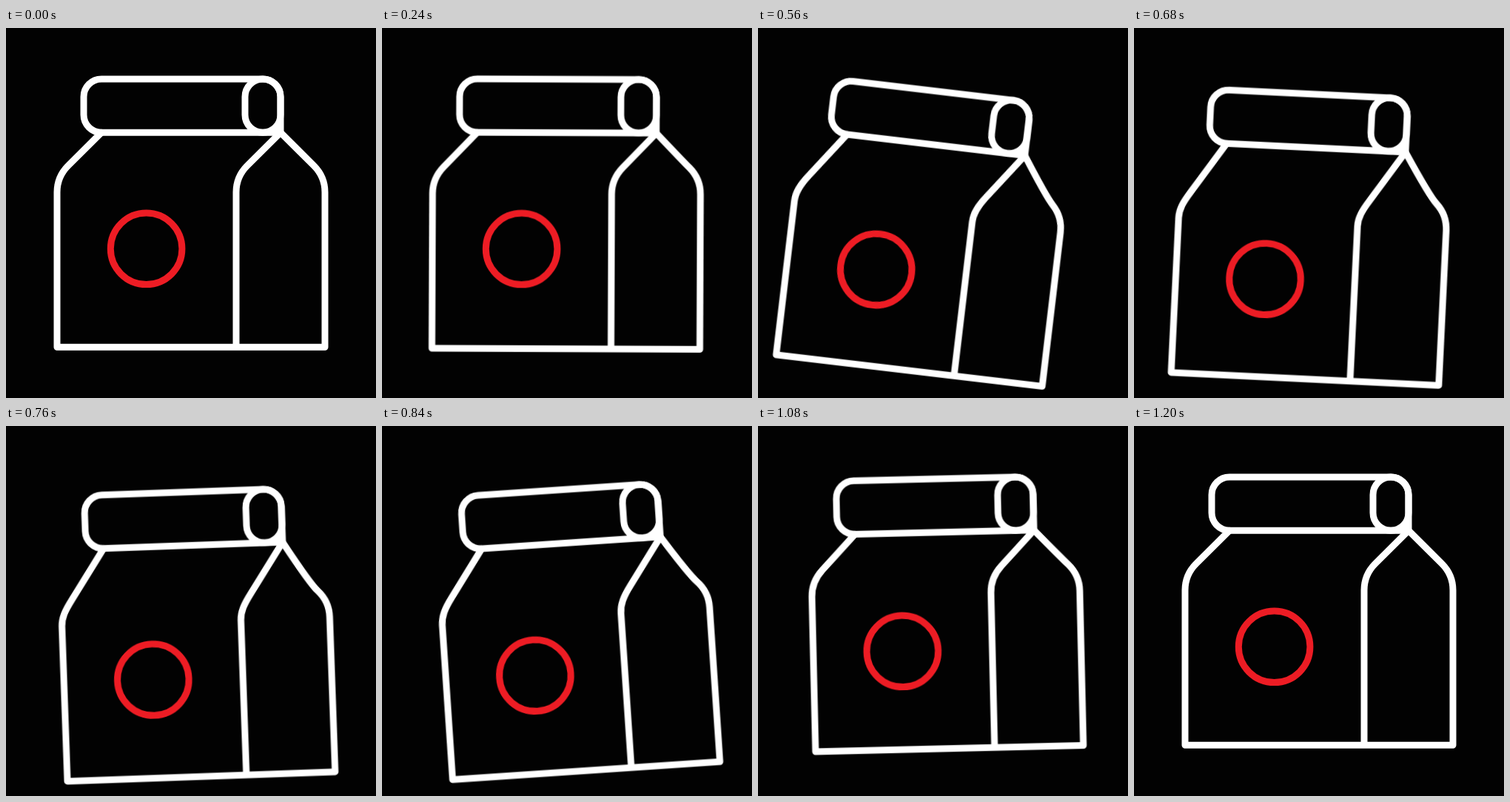
Recreate the animation shown at these times as an HTML page without scripts. Size 500 by 500 pixels, loop 1400 ms.

```html
<!DOCTYPE html>
<html lang="en">
<head>
<meta charset="utf-8">
<title>Bouncing paper bag</title>
<style>
  html, body { margin: 0; width: 100%; height: 100%; overflow: hidden; background: #020202; }
  svg { display: block; width: 100%; height: 100%; }

  .lines { fill: none; stroke: #fff; stroke-width: 9; stroke-linejoin: round; stroke-linecap: round; }
  .badge { stroke: #ed1c24; }

  .drop, .tilt, .badge, .body { animation: 1.4s linear infinite; }
  .drop, .badge { animation-name: drop; }
  .drop { --fall: 20.8px; }
  .badge { --fall: 23.5px; }
  .tilt { animation-name: tilt; transform-origin: 250px 60px; }
  .body { animation-name: stretch; }

  @keyframes drop {
    0% { transform: translateY(0); }
    14.2857% { transform: translateY(0); animation-timing-function: cubic-bezier(.45, 0, .58, 1); }
    50% { transform: translateY(var(--fall)); animation-timing-function: cubic-bezier(.36, 0, .57, 1); }
    85.7143%, 100% { transform: translateY(0); }
  }

  @keyframes tilt {
    0% { transform: rotate(0deg); }
    14.2857% { transform: rotate(0deg); animation-timing-function: cubic-bezier(.45, 0, .58, 1); }
    35.7143% { transform: rotate(7.05deg); animation-timing-function: cubic-bezier(.6, 0, .4, 1); }
    64.2857% { transform: rotate(-4.1deg); animation-timing-function: ease-in-out; }
    85.7143%, 100% { transform: rotate(0deg); }
  }

  /* The neck stays on the roll while the body sinks below it. */
  @keyframes stretch {
    0%, 14.2857%, 85.7143%, 100% {
      d: path("M129 141.3 L83.9 186.1 C74.4 195.6 69 208.6 69 222 L69 431.3 L431 431.3 L431 222 C431 208.6 425.6 195.6 416.1 186.1 C406.1 176.1 371 141.3 371 141.3 L325.9 186.1 C316.4 195.6 311 208.6 311 222 L311 431.3");
    }
    14.2857% { animation-timing-function: cubic-bezier(.45, 0, .58, 1); }
    50% {
      d: path("M129 141.3 L83.9 209.6 C74 224.4 69 233.8 69 245.5 L69 454.8 L431 454.8 L431 245.5 C431 232.1 425.6 219.1 416.1 209.6 C406.1 199.6 371 141.3 371 141.3 L325.9 209.6 C316 224.4 311 233.8 311 245.5 L311 454.8");
      animation-timing-function: cubic-bezier(.36, 0, .57, 1);
    }
  }
</style>
</head>
<body>
<svg viewBox="0 0 500 500" aria-label="Paper bag">
  <g class="lines drop">
    <g class="tilt">
      <path class="body" d="M129 141.3 L83.9 186.1 C74.4 195.6 69 208.6 69 222 L69 431.3 L431 431.3 L431 222 C431 208.6 425.6 195.6 416.1 186.1 C406.1 176.1 371 141.3 371 141.3 L325.9 186.1 C316.4 195.6 311 208.6 311 222 L311 431.3"/>
      <path d="M371 141.3 H129 A24 24 0 0 1 105 117.3 V93 A24 24 0 0 1 129 69 H347 A24 24 0 0 1 371 93 Z"/>
      <rect x="323" y="69" width="48" height="72.3" rx="24"/>
      <circle class="badge" cx="189.6" cy="298.3" r="48.3"/>
    </g>
  </g>
</svg>
</body>
</html>
```
